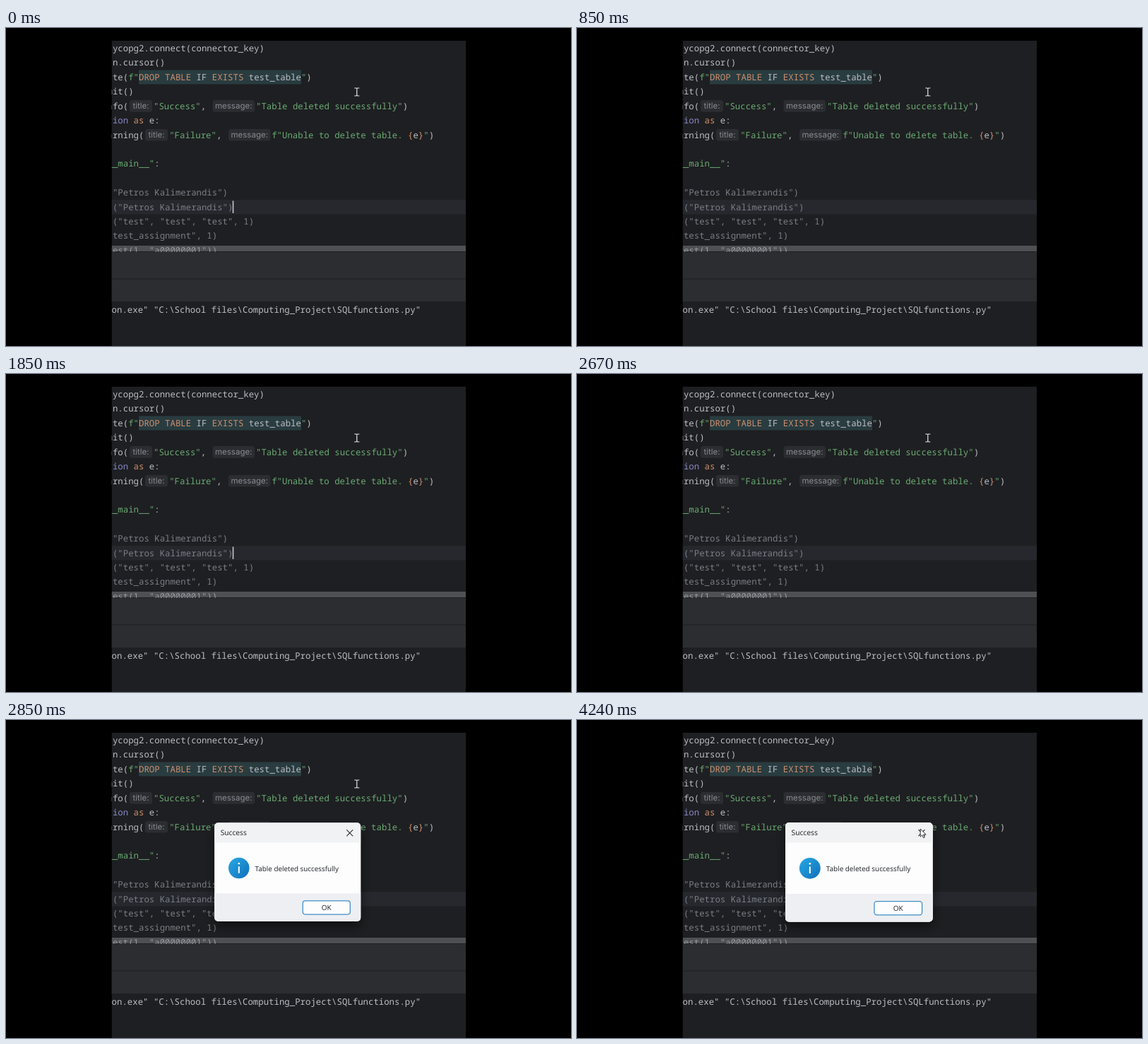
Recreate the animation shown at these times as an HTML page. Size 800x450 px, loop 4270 ms.

```html
<!DOCTYPE html>
<html lang="en">
<head>
<meta charset="utf-8">
<style>
  html, body { margin: 0; width: 100%; height: 100%; overflow: hidden; background: #000; }
  svg { display: block; width: 800px; height: 450px; }
  text { white-space: pre; text-rendering: geometricPrecision; }
  .code { font: 12.37px "Noto Sans Mono", "DejaVu Sans Mono", monospace; }
  .hint { font: 11.5px Inter, sans-serif; fill: #868a91; }
  .ui { font-family: "Open Sans", "Noto Sans", sans-serif; fill: #1d1f23; }
</style>
</head>
<body>
<svg viewBox="0 0 800 450">
  <defs>
    <clipPath id="screen"><path d="M149.5 18H651V450H149.5z"/></clipPath>
    <clipPath id="editor"><path d="M149.5 18H651V317H149.5z"/></clipPath>
    <clipPath id="window"><rect x="295" y="145.3" width="208.6" height="140.2" rx="5"/></clipPath>
    <linearGradient id="blue" x1="0" y1="0" x2="1" y2="1">
      <stop offset="0" stop-color="#27a9e6"/><stop offset="1" stop-color="#116fb8"/>
    </linearGradient>
    <filter id="shadow" x="-30%" y="-30%" width="160%" height="170%">
      <feDropShadow dx="0" dy="7" stdDeviation="8" flood-color="#000" flood-opacity=".5"/>
    </filter>
  </defs>
  <g clip-path="url(#screen)">
    <rect x="149.5" y="18" width="502" height="432" fill="#1e1f22"/>
    <g clip-path="url(#editor)">
      <rect x="149.5" y="243.2" width="502" height="20.2" fill="#26282e"/>
      <rect x="188" y="59.5" width="230" height="20" fill="#293c40"/>
      <g id="code"></g>
      <rect id="caret" x="320.8" y="244.5" width="1.5" height="17.5" fill="#ced0d6"/>
      <rect x="149.5" y="308" width="502" height="8" fill="#fff" opacity=".22"/>
    </g>
    <rect x="149.5" y="317" width="502" height="71" fill="#2b2d30"/>
    <path d="M149.5 355H651M149.5 387.5H651" stroke="#1e1f22"/>
    <g id="console"></g>
    <g id="dialog">
      <rect x="295" y="145.3" width="208.6" height="140.2" rx="5" fill="#fff" filter="url(#shadow)"/>
      <g clip-path="url(#window)">
        <rect x="295" y="145" width="209" height="141" fill="#fdfdfe"/>
        <rect x="295" y="145" width="209" height="28.5" fill="#f1f2f4"/>
        <rect x="295" y="246" width="209" height="40" fill="#eeeff2"/>
      </g>
      <text class="ui" x="303.5" y="163.3" font-size="10.3">Success</text>
      <path d="M483.5 155.2l9 9m0-9l-9 9" stroke="#2b2c30" stroke-width="1.1"/>
      <circle cx="329.8" cy="209.8" r="14.9" fill="url(#blue)"/>
      <path d="M329.8 207.5V217" stroke="#fff" stroke-width="2"/>
      <circle cx="329.8" cy="203.3" r="1.4" fill="#fff"/>
      <text class="ui" x="352.8" y="214.3" font-size="9.95" font-weight="500">Table deleted successfully</text>
      <rect x="421" y="256.6" width="67.6" height="19.2" rx="3.5" fill="#fdfdfe" stroke="#3f8fc9" stroke-width="1.3"/>
      <text class="ui" x="454.8" y="269.8" font-size="10" font-weight="500" text-anchor="middle">OK</text>
    </g>
    <path id="beam" d="M-3.5 -5.5H-1L0 -4.8L1 -5.5H3.5M0 -5V5M-3.5 5.5H-1L0 4.8L1 5.5H3.5"
          fill="none" stroke="#e6e6e6" stroke-width="1.2"/>
    <path id="arrow" d="M0 0V11.2L2.6 8.8L4.3 12.8L6.1 12L4.4 8.2H8z" fill="#fff" stroke="#222" stroke-width=".9"/>
  </g>
</svg>
<script>
const LOOP = 4270;
const LEFT = 150.9, ADVANCE = 7.422, FIRST_LINE = 33, LINE = 20.42;
const PLAIN = "#bcbec4", KEY = "#cf8e6d", STR = "#6aab73", TYPE = "#8888c6", NOTE = "#7a7e85";
const PERSON = "Petros Kalimerandis";
const $ = id => document.getElementById(id);

const textAt = (x, y, parts) => `<text class="code" x="${x}" y="${y}">` +
  parts.map(([color, s]) => `<tspan fill="${color}">${s}</tspan>`).join("") + "</text>";
const lineY = row => FIRST_LINE + LINE * row;
// "cut" counts leading characters that fall left of the visible edge
const line = (row, cut, ...parts) => textAt(LEFT - cut * ADVANCE, lineY(row), parts);
const span = (row, x, ...parts) => textAt(x, lineY(row), parts);
const hint = (row, x, width, label) => {
  const y = lineY(row);
  return `<rect x="${x}" y="${y - 12.6}" width="${width}" height="16.6" rx="3.5" fill="#2b2d30"/>` +
    `<text class="hint" x="${x + width / 2}" y="${y - .4}" text-anchor="middle">${label}</text>`;
};

$("code").innerHTML = [
  line(0, 0, [PLAIN, "ycopg2.connect(connector_key)"]),
  line(1, 0, [PLAIN, "n.cursor()"]),
  line(2, 0, [PLAIN, "te("], [STR, 'f"'], [KEY, "DROP TABLE "], [PLAIN, "IF "], [KEY, "EXISTS "],
    [PLAIN, "test_table"], [STR, '"'], [PLAIN, ")"]),
  line(3, 1, [PLAIN, "mit()"]),
  line(4, 1, [PLAIN, "nfo("]),
  hint(4, 175, 32, "title:"),
  span(4, 209, [STR, '"Success"'], [PLAIN, ","]),
  hint(4, 292.5, 59.5, "message:"),
  span(4, 354, [STR, '"Table deleted successfully"'], [PLAIN, ")"]),
  line(5, 1, [TYPE, "tion "], [KEY, "as "], [PLAIN, "e:"]),
  line(6, 1, [PLAIN, "arning("]),
  hint(6, 197, 32, "title:"),
  span(6, 231.2, [STR, '"Failure"'], [PLAIN, ","]),
  hint(6, 315, 59.5, "message:"),
  span(6, 376.2, [STR, 'f"Unable to delete table. '], [KEY, "{"], [PLAIN, "e"], [KEY, "}"], [STR, '"'], [PLAIN, ")"]),
  line(8, 1, [STR, '__main__"'], [PLAIN, ":"]),
  line(10, 0, [NOTE, `"${PERSON}")`]),
  line(11, 0, [NOTE, `("${PERSON}")`]),
  line(12, 0, [NOTE, '("test", "test", "test", 1)']),
  line(13, 1, [NOTE, '"test_assignment", 1)']),
  line(14, 1, [NOTE, 'test(1, "a00000001"))'])
].join("");
$("console").innerHTML =
  textAt(149.6, 403.2, [[PLAIN, 'on.exe" "C:\\School files\\Computing_Project\\SQLfunctions.py"']]);

const progress = (t, start, length) => Math.min(1, Math.max(0, (t - start) / length));
const show = (id, on) => $(id).setAttribute("visibility", on ? "visible" : "hidden");
const moveTo = (id, x, y) => $(id).setAttribute("transform", `translate(${x} ${y})`);

function draw(t) {
  const blinkedOff = Math.floor((t + 450) / 900) % 2 === 1;
  show("caret", !blinkedOff && t < 2700);

  const open = progress(t, 2700, 230);
  const scale = .8 + .2 * (1 - (1 - open) ** 3);
  $("dialog").setAttribute("transform", `translate(330 180) scale(${scale}) translate(-330 -180)`);
  $("dialog").setAttribute("opacity", Math.min(1, open / .35));
  show("dialog", open > 0);

  const p = progress(t, 3700, 450);
  const travel = p * p * (3 - 2 * p);
  const x = 496.8 - 10.6 * travel, y = 90.5 + 63.5 * travel;
  const overDialog = y > 145.3;
  moveTo("beam", x, y);
  moveTo("arrow", x, y);
  show("beam", !overDialog);
  show("arrow", overDialog);
}

const start = performance.now();
function tick() {
  draw((performance.now() - start) % LOOP);
  requestAnimationFrame(tick);
}
tick();
</script>
</body>
</html>
```
